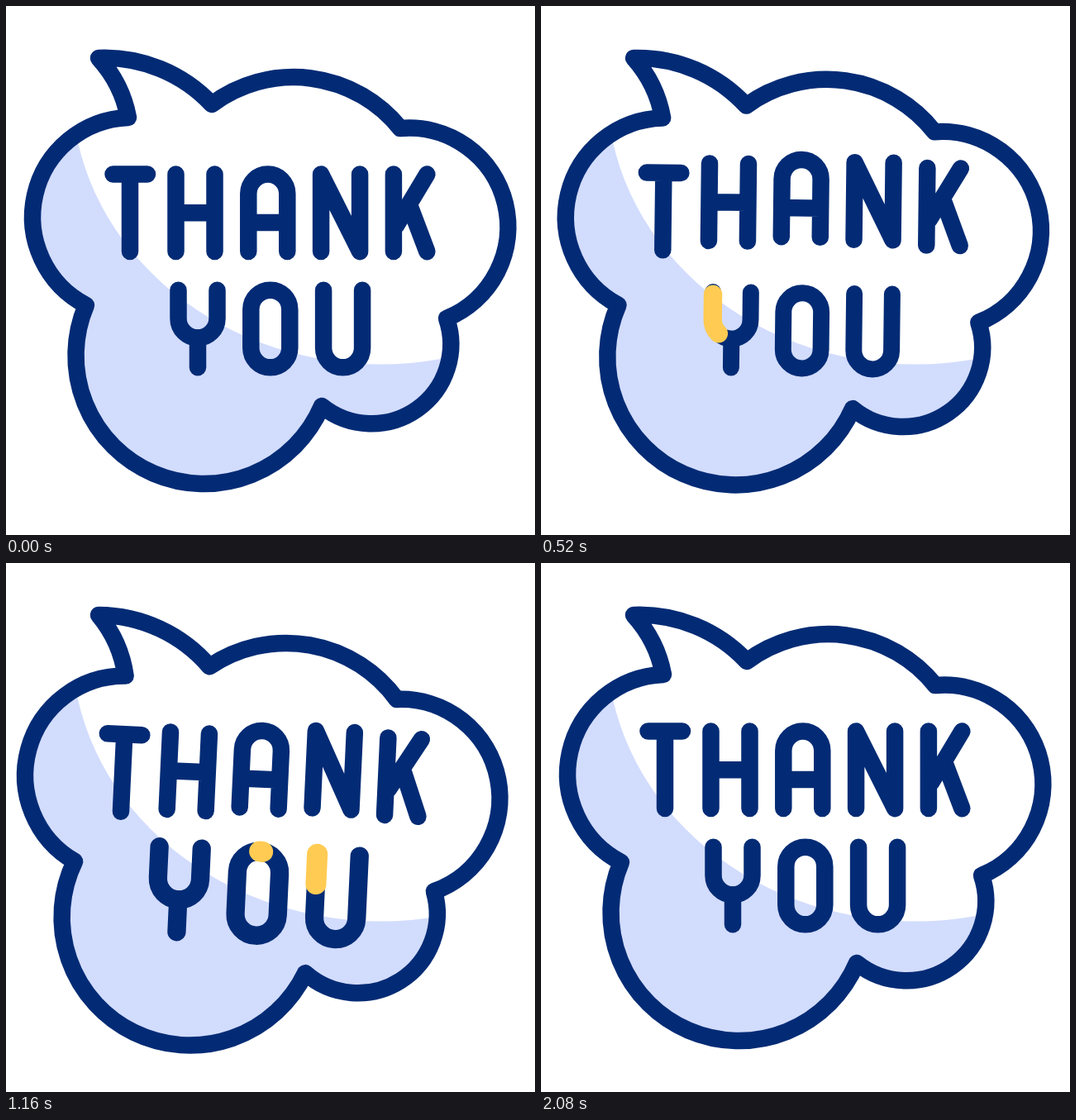
Recreate the animation shown at these times as an HTML page with a canvas. Size 640 px wide and 640 px high, loop 2160 ms.

```html
<!DOCTYPE html>
<html lang="en">
<head>
<meta charset="utf-8">
<title>Thank you</title>
<style>
  html, body { margin: 0; width: 100%; height: 100%; overflow: hidden; background: #fff; }
  canvas { display: block; width: 640px; height: 640px; }
</style>
</head>
<body>
<canvas id="stage" width="640" height="640" role="img" aria-label="Thank you"></canvas>
<script>
const ctx = document.getElementById('stage').getContext('2d');
const LOOP = 2160, STEP = 40, LAST = 2080;
const NAVY = '#032b75', SHADE = '#d2dcfd', YELLOW = '#ffcb52';
const LINE = 20.5, GLOW = 23;
const PIVOT = [112, 63], WORD = [320, 390.5];

// Letter cell: width, height, bowl radius, distance to the next letter
const W = 47, H = 93.6, R = W / 2, ADVANCE = 87.8;
const ARC = Math.PI * R, SIDE = H - W;
const THANK_X = 117.7, THANK_Y = 203.5, YOU_X = 208.5, YOU_Y = 343.7;

const BEAT = 280, FIRST = 360, HOP_LAG = 80, TRIM_LAG = 160;

// Corners of the bubble, each with the radius of the arc that leads to it;
// a negative radius bends inwards
const corners = [
  [249, 119, 178], [477, 148, 165.5], [533, 378, 119.7], [382, 484, 96],
  [97, 362, 155], [148, 135, 120.3], [112, 63, -147]
];
const cloud = new Path2D(`M${PIVOT}` + corners.map(([x, y, r]) =>
  `A${Math.abs(r)} ${Math.abs(r)} 0 0 ${r > 0 ? 1 : 0} ${x} ${y}`).join('') + 'Z');

const shade = new Path2D('M0 0H640V640H0Z');
shade.ellipse(453, 98, 373.5, 335.5, 0, 0, Math.PI * 2);

const bowl = (dx, sweep) => `a${R} ${R} 0 0 ${sweep} ${dx} 0`;
const cup = depth => `M0 0V${depth}${bowl(W, 0)}V0`;

const thank = [
  `M11.8 0H53.3M32.3 0V${H}`,
  `M0 0V${H}M${W} 0V${H}M0 ${H / 2}H${W}`,
  `M0 ${H}V${R}${bowl(W, 1)}V${H}M0 58.5H${W}`,
  `M0 ${H}V0L${W} ${H}V0`,
  `M0 0V${H}M40.5 0L3 62.5M40.5 ${H}L20 39.5`
].map(d => new Path2D(d));

// Strokes of the second word, with the time each highlight enters
const stroke = (column, d, len, from, dur = 480) =>
  ({ x: YOU_X + column * ADVANCE, path: new Path2D(d), len, from, dur });
const NECK = H - W - 12.3, STEM = NECK + R;
const you = [
  stroke(0, cup(NECK), 2 * NECK + ARC, 320),
  stroke(0, `M${R} ${STEM}V${H}`, H - STEM, 560, 340),
  stroke(1, `M${R} 0A${R} ${R} 0 0 0 0 ${R}v${SIDE}${bowl(W, 0)}v${-SIDE}A${R} ${R} 0 0 0 ${R} 0`,
    2 * (SIDE + ARC), 560),
  stroke(2, cup(H - R), 2 * (H - R) + ARC, 1040)
];

function ease(x) {
  x = Math.min(1, Math.max(0, x));
  return x * x * (3 - 2 * x);
}

// Rises from rest to the first peak, then meets one peak per beat
function swing(t, peaks, start, first) {
  let from = 0, begin = start, value = 0;
  peaks.forEach((peak, i) => {
    const end = first + i * BEAT;
    value += (peak - from) * ease((t - begin) / (end - begin));
    from = peak;
    begin = end;
  });
  return value;
}

const tilt = t => swing(t, [-6, 5, -3, 3, -1, 0], 0, FIRST) * Math.PI / 180;
const hop = t => swing(t, [-20, 9.4, -13, 3, -6.8, 0], 0, FIRST);
const pulse = t => 1 + 0.1 * swing(t, [-1, 1, -1, 0], 320, FIRST + 2 * BEAT);

function around([x, y], transform) {
  ctx.translate(x, y);
  transform();
  ctx.translate(-x, -y);
}

function at(x, y, paint) {
  ctx.translate(x, y);
  paint();
  ctx.translate(-x, -y);
}

function pen(color, width) {
  ctx.strokeStyle = color;
  ctx.lineWidth = width;
}

function drawCloud(angle) {
  const turn = () => around(PIVOT, () => ctx.rotate(angle));
  ctx.save();
  turn();
  ctx.clip(cloud);
  ctx.resetTransform();   // the shade stays still
  ctx.fillStyle = SHADE;
  ctx.fill(shade, 'evenodd');
  ctx.restore();
  turn();
  pen(NAVY, LINE);
  ctx.stroke(cloud);
}

function drawHighlight(s, t) {
  const end = ease((t - s.from) / s.dur);
  const start = ease((t - s.from - TRIM_LAG) / s.dur);
  if (end <= start) return;
  ctx.setLineDash([s.len * (end - start), 9999]);
  ctx.lineDashOffset = -s.len * start;
  at(s.x, YOU_Y, () => ctx.stroke(s.path));
}

function draw(t) {
  ctx.resetTransform();
  ctx.setLineDash([]);
  ctx.fillStyle = '#fff';
  ctx.fillRect(0, 0, 640, 640);
  ctx.lineCap = ctx.lineJoin = 'round';

  drawCloud(tilt(t));

  thank.forEach((letter, i) =>
    at(THANK_X + i * ADVANCE, THANK_Y + hop(t - i * HOP_LAG), () => ctx.stroke(letter)));

  around(WORD, () => ctx.scale(pulse(t), pulse(t)));
  you.forEach(s => at(s.x, YOU_Y, () => ctx.stroke(s.path)));
  pen(YELLOW, GLOW);
  you.forEach(s => drawHighlight(s, t));
}

const begin = performance.now();
function tick() {
  const t = (performance.now() - begin) % LOOP;
  draw(Math.min(LAST, Math.floor(t / STEP) * STEP));
  requestAnimationFrame(tick);
}
tick();
</script>
</body>
</html>
```
